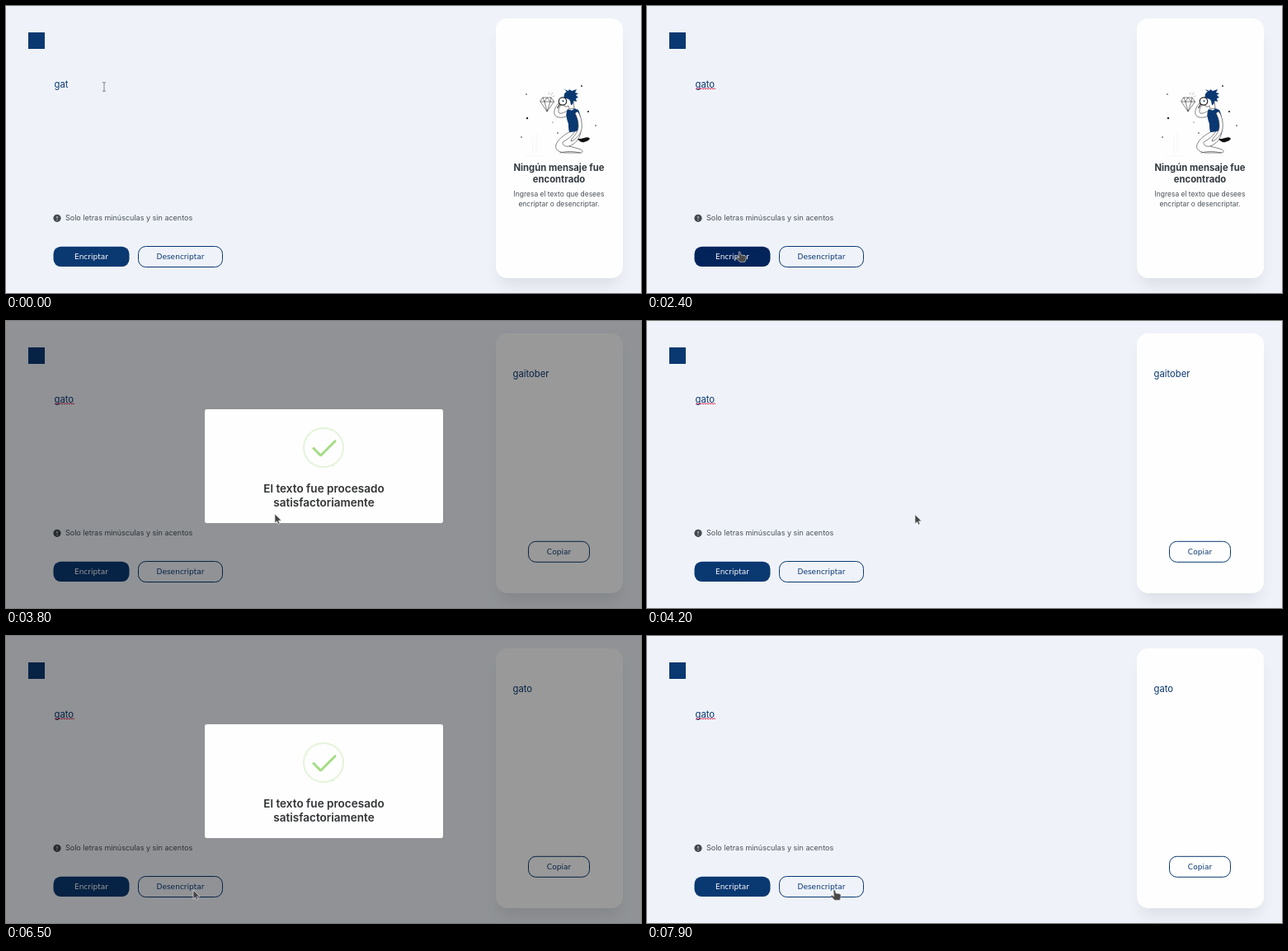
Write an HTML page that moves like this. It is 770 by 348 pixels and loops after 8 s.

```html
<!DOCTYPE html>
<html lang="es">
<head>
<meta charset="utf-8">
<title>Encriptador</title>
<style>
  html, body { margin: 0; width: 100%; height: 100%; overflow: hidden; background: #eff3f9; }
  svg, #backdrop { position: absolute; left: 0; top: 0; width: 770px; height: 348px; }
  #panel { position: absolute; left: 594px; top: 14.5px; width: 153.5px; height: 315.5px; border-radius: 14px;
    background: #fefefe; box-shadow: 0 13px 18px -4px rgba(0, 0, 0, .08); }
  text { font: 9.03px Inter, sans-serif; fill: #495057; }
  .big { font-size: 11.29px; fill: #0a3871; }
  .title { font-size: 11.29px; font-weight: 700; fill: #343a40; }
  .note { font-size: 8.45px; }
  .mid { text-anchor: middle; }
  .label { font-family: "DejaVu Sans", sans-serif; fill: #0a3871; text-anchor: middle; }
  .outline { fill: none; stroke: #0a3871; }
  .ink { fill: none; stroke: #333; stroke-width: .6; stroke-linejoin: round; stroke-linecap: round; }
  .skin { fill: #fefefe; }
  .navy { fill: #0a3871; }

  #backdrop { background: #000; }
  #popup { position: absolute; left: 241px; top: 106.5px; width: 289px; height: 138px; font-size: 9.03px;
    background: #fefefe; border-radius: .3125em; }
  #popup p { position: absolute; left: 0; right: 0; top: 88.3px; margin: 0; text-align: center;
    font: 600 13.55px/1.21 Inter, sans-serif; color: #303234; }
  #icon { position: absolute; left: 50%; top: 2.5em; margin-left: -2.75em; width: 5em; height: 5em;
    border: .25em solid #a5dc86; border-radius: 50%; }
  #icon div { position: absolute; }
  .half { width: 3.75em; height: 7.5em; background: #fefefe; transform: rotate(-45deg); }
  .left { top: -.4375em; left: -2.0635em; transform-origin: 3.75em 3.75em; border-radius: 7.5em 0 0 7.5em; }
  #sweep { top: -.6875em; left: 1.875em; transform-origin: 0 3.75em; border-radius: 0 7.5em 7.5em 0; }
  .seam { top: .5em; left: 1.625em; width: .4375em; height: 5.625em; background: #fefefe; transform: rotate(-45deg); }
  .ring { top: -.25em; left: -.25em; width: 100%; height: 100%; border: .25em solid rgba(165, 220, 134, .3); border-radius: 50%; }
  .line { height: .3125em; border-radius: .125em; background: #a5dc86; }
  #tip { transform: rotate(45deg); }
  #long { transform: rotate(-45deg); }
</style>
</head>
<body>
<div id="panel"></div>
<svg viewBox="0 0 770 348">
  <rect class="navy" x="27" y="32" width="20" height="20"/>
  <text class="big" id="input" x="58.5" y="98.6"></text>
  <path id="squiggle" fill="none" stroke="#d9143c" stroke-width=".9"/>
  <circle cx="62" cy="257.3" r="4.6" fill="#43494f"/>
  <path d="M62 254.8v3M62 259v1" stroke="#eff3f9" stroke-width=".9"/>
  <text x="72" y="260.3">Solo letras minúsculas y sin acentos</text>
  <rect id="encrypt" x="57.5" y="291.7" width="92" height="24.4" rx="9"/>
  <text class="label" x="103.5" y="307" style="fill:#fff">Encriptar</text>
  <rect class="outline" x="160.5" y="291.5" width="102" height="25" rx="9"/>
  <text class="label" x="211.5" y="307">Desencriptar</text>

  <g id="empty">
    <g id="dots" fill="#222"></g>
    <g class="ink">
      <path d="M651 111h10l3.500 5-8.500 12-8-12zM648 116h16.500M651 111l2 5 3 12 4-12 1-5M653 116l3-5 4 5"/>
      <path d="M658 107l1-2M661 108l2-3M663 110l2-1" stroke="#999"/>
      <path d="M639 180v-20M643 178v-24M630 182h22" stroke="#eee"/>
      <path class="skin" d="M690 150C681 153 670 160 667 168c-2 6 3 9 10 10l20 0c4-1 2-4-3-5l-11-3c7-3 13-8 14-18z"/>
      <path d="M683 170c-5 1-8-1-8-4M672 178c8-2 15-2 24 0M690 152c-4 6-9 10-15 13"/>
      <path class="skin" d="M681 127c-4 2-8 4-10 3-2-2-1-6 2-10l-3-2c-3 3-6 8-5 13 2 5 9 5 14 3z"/>
      <path class="skin" d="M677 110c-1 4-2 7 0 11 1 2 4 1 5 0l1 4 6-1-1-9-4-7z"/>
    </g>
    <path class="navy" d="M677 112c-1-4 0-7 3-8l-3-3 5 2 1-2 3 2 6-2-2 4 4 1-3 2 3 3-3 1 1 4-4-1c0 3-1 5-3 5l-1-5c-2-3-4-3-7-3z"/>
    <path class="navy" d="M681 125l3 1c2 1 4 0 5-2l5 2c3 6 4 14 3 24-5 2-9 3-14 3-1-4-1-7-1-10-2-6-4-12-1-18z"/>
    <path class="ink skin" d="M693 128c4 4 6 13 5 21-1 6-5 10-10 14l-3 1 1-3c5-5 8-10 8-16 0-6-2-11-4-15z"/>
    <path d="M693 161c3 0 5 0 8-1 3-1 6-1 7 1-1 2-4 3-7 4-2 1-5 0-8-4z" fill="#111"/>
    <circle cx="675" cy="115.500" r="4.700" fill="#fefefe" stroke="#222" stroke-width="1.200"/>
    <path d="M671.500 119l-3 5" stroke="#222" stroke-width="1.200"/>
    <circle class="navy" cx="675.500" cy="115.300" r="1"/>
    <text class="title mid" x="670.5" y="200.2">Ningún mensaje fue</text>
    <text class="title mid" x="670.5" y="213.8">encontrado</text>
    <text class="note mid" x="670.5" y="231">Ingresa el texto que desees</text>
    <text class="note mid" x="670.5" y="243.3">encriptar o desencriptar.</text>
  </g>
  <g id="result">
    <text class="big" id="output" x="614.5" y="67.6"></text>
    <rect class="outline" x="633.5" y="267.3" width="74" height="25" rx="9"/>
    <text class="label" x="670.5" y="283">Copiar</text>
  </g>
</svg>

<div id="backdrop"></div>
<div id="popup">
  <div id="icon">
    <div class="half left"></div><div class="half" id="sweep"></div><div class="seam"></div>
    <div class="ring"></div><div class="line" id="tip"></div><div class="line" id="long"></div>
  </div>
  <p>El texto fue procesado<br>satisfactoriamente</p>
</div>

<svg viewBox="0 0 770 348">
  <g id="cursor" stroke-linejoin="round">
    <path id="ibeam" d="M-2-5.500q2 0 2 1q0-1 2-1M0-5V5M-2 5.500q2 0 2-1q0 1 2 1" fill="none" stroke="#777" stroke-width=".9"/>
    <path id="arrow" d="M0 0V11l2.500-2.200L4.200 12.300 6 11.500 4.500 8H8z" fill="#444" stroke="#e8e8e8" stroke-width=".7"/>
    <path id="hand" d="M-1 .5q1-1.500 2 0L2.200 4l4 .5q1.800.3 1.800 2V9l-1.200 3.300H.5L-4 7.500q0-1.500 1.500-1L-.3 7.800z" fill="#4a4a4a" stroke="#d8d8d8" stroke-width=".6"/>
  </g>
</svg>

<script>
const $ = id => document.getElementById(id);
const show = (id, on) => { $(id).style.visibility = on ? 'visible' : 'hidden'; };

const LOOP = 8000, STEP = 100;
const ENCRYPT = 2470, DECRYPT = 5695;   // click times
const STAY = 1500, CLOSED = 1650;       // dialog timing after a click

$('squiggle').setAttribute('d', 'M59 101' + 'l1.500-1.400l1.500 1.400'.repeat(8));
$('dots').innerHTML = [[631, 107, .8], [632, 136, 1.2], [698, 97, .9], [706, 128, 1.1], [715, 145, .8],
  [625, 159, .8], [669, 154, .8], [663, 141, .6]]
  .map(([x, y, r]) => `<circle cx="${x}" cy="${y}" r="${r}"/>`).join('');

// Paused animations, driven only by the dialog's own time
const tracks = [];
function track(id, duration, frames, easing = 'ease') {
  const keys = frames.map(([at, props]) => ({ offset: at / duration, easing, ...props }));
  const animation = $(id).animate(keys, { duration, fill: 'both' });
  animation.pause();
  tracks.push(animation);
}
const scale = (s, opacity = 1) => ({ transform: `scale(${s})`, opacity });
const turn = deg => ({ transform: `rotate(${deg}deg)` });
const bar = (side, top, offset, width) => ({ top: top + 'em', [side]: offset + 'em', width: width + 'em' });

track('popup', CLOSED, [[0, scale(.7)], [135, scale(1.05)], [240, scale(.95)], [300, scale(1)],
  [STAY, scale(1)], [CLOSED, scale(.5, 0)]]);
track('backdrop', CLOSED, [[0, { opacity: 0 }], [100, { opacity: .4 }], [STAY, { opacity: .4 }],
  [STAY + 100, { opacity: 0 }], [CLOSED, { opacity: 0 }]]);
track('sweep', 4250, [[0, turn(-45)], [212.5, turn(-45)], [510, turn(-405)], [4250, turn(-405)]], 'ease-in');
track('tip', 750, [[0, bar('left', 1.1875, .0625, 0)], [405, bar('left', 1.0625, .125, 0)],
  [525, bar('left', 2.1875, -.375, 3.125)], [630, bar('left', 3, 1.3125, 1.0625)],
  [750, bar('left', 2.8125, .8125, 1.5625)]]);
track('long', 750, [[0, bar('right', 3.375, 2.875, 0)], [487.5, bar('right', 3.375, 2.875, 0)],
  [630, bar('right', 2.1875, 0, 3.4375)], [750, bar('right', 2.375, .5, 2.9375)]]);

// Pointer stops: [leave, arrive, x, y]
const moves = [[0, 0, 119, 98], [1050, 2000, 112, 298], [3420, 3800, 326, 234], [4150, 5000, 227, 308]];
function pointer(t) {
  let x = 0, y = 0;
  for (const [from, to, toX, toY] of moves) {
    if (t < from) break;
    const p = to > from ? Math.min(1, (t - from) / (to - from)) : 1;
    const k = p * p * (3 - 2 * p);
    x += (toX - x) * k;
    y += (toY - y) * k;
  }
  return [x, y];
}

function draw(t) {
  $('input').textContent = t < 300 ? 'gat' : 'gato';
  show('squiggle', t >= 1100);
  $('encrypt').setAttribute('fill', t >= 2300 && t < ENCRYPT ? '#03245a' : '#0a3871');
  show('empty', t < ENCRYPT);
  show('result', t >= ENCRYPT);
  $('output').textContent = t < DECRYPT ? 'gaitober' : 'gato';

  const dialog = t - (t < DECRYPT ? ENCRYPT : DECRYPT);
  const open = dialog >= 0 && dialog < CLOSED;
  show('popup', open);
  show('backdrop', open);
  for (const animation of tracks) animation.currentTime = Math.max(0, dialog);

  const [x, y] = pointer(t);
  $('cursor').setAttribute('transform', `translate(${x} ${y})`);
  const hand = (t >= 2000 && t < ENCRYPT) || (t >= 5000 && t < DECRYPT) || t >= 7900;
  const ibeam = t < 2000 && y < 240;
  show('hand', hand);
  show('ibeam', ibeam);
  show('arrow', !hand && !ibeam);
}

const began = performance.now();
function tick() {
  const t = (performance.now() - began) % LOOP;
  draw(Math.floor(t / STEP) * STEP);
  requestAnimationFrame(tick);
}
tick();
</script>
</body>
</html>
```
